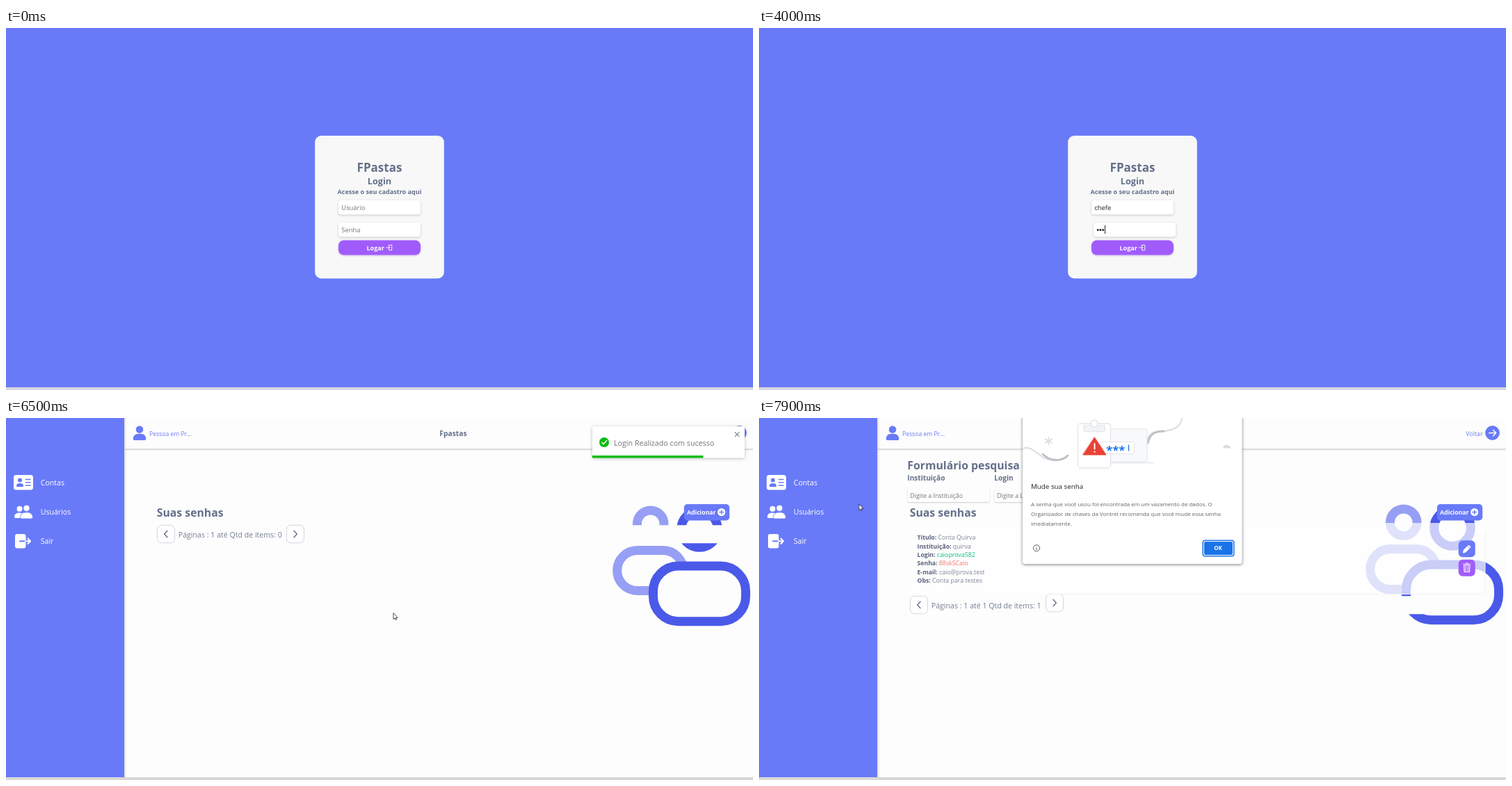
An HTML page with a canvas for the animation above (8000 ms loop, 1074x521 px).

```html
<!DOCTYPE html>
<html lang="pt">
<head>
<meta charset="utf-8">
<title>Login</title>
<style>
html, body { margin: 0; width: 100%; height: 100%; overflow: hidden; background: #697af8; }
canvas { display: block; width: 1074px; height: 521px; }
</style>
</head>
<body>
<canvas id="stage" width="1074" height="521"></canvas>
<script>
const W = 1074, H = 521, LOOP = 8000;
const BLUE = '#697af8', PURPLE = '#a05cfb', SLATE = '#64708a', GREY = '#757575';
const APP = 'FPastas', USER = 'chefe';
const c = document.getElementById('stage').getContext('2d');

// ---------- helpers ----------
const clamp = v => Math.max(0, Math.min(1, v));
const mix = (a, b, p) => a + (b - a) * p;

function bezier(x1, y1, x2, y2) {
  const at = (a, b, s) => 3 * a * s * (1 - s) ** 2 + 3 * b * s * s * (1 - s) + s ** 3;
  return x => {
    let lo = 0, hi = 1;
    for (let i = 0; i < 24; i++) {
      const m = (lo + hi) / 2;
      if (at(x1, x2, m) < x) lo = m; else hi = m;
    }
    return at(y1, y2, (lo + hi) / 2);
  };
}
const ease = bezier(.25, .1, .25, 1);
const easeOut = bezier(.215, .61, .355, 1);
const progress = (t, start, length) => ease(clamp((t - start) / length));

function along(points, t, curve = p => p) {
  for (let i = 1; i < points.length; i++) {
    const [t0, ...a] = points[i - 1], [t1, ...b] = points[i];
    if (t <= t1) {
      const p = curve(clamp((t - t0) / (t1 - t0)));
      return a.map((v, k) => mix(v, b[k], p));
    }
  }
  return points[points.length - 1].slice(1);
}

function layer(dx, dy, alpha, draw) {
  c.save();
  c.translate(dx, dy);
  c.globalAlpha *= alpha;
  draw();
  c.restore();
}

function shadow(y, blur, color) {
  c.shadowOffsetY = y; c.shadowBlur = blur; c.shadowColor = color;
}

function box(x, y, w, h, r, fill, stroke, lw = 1) {
  c.beginPath();
  c.roundRect(x, y, w, h, r);
  if (fill) { c.fillStyle = fill; c.fill(); }
  if (stroke) { c.strokeStyle = stroke; c.lineWidth = lw; c.stroke(); }
}

function raised(x, y, w, h, r, fill, dy, blur, color) {
  c.save();
  shadow(dy, blur, color);
  box(x, y, w, h, r, fill);
  c.restore();
}

function disc(x, y, r, fill, stroke, lw = 1) {
  c.beginPath();
  c.arc(x, y, r, 0, 7);
  if (fill) { c.fillStyle = fill; c.fill(); }
  if (stroke) { c.strokeStyle = stroke; c.lineWidth = lw; c.stroke(); }
}

function path(d, stroke, lw, fill) {
  const p = new Path2D(d);
  c.lineCap = c.lineJoin = 'round';
  if (fill) { c.fillStyle = fill; c.fill(p); }
  if (stroke) { c.strokeStyle = stroke; c.lineWidth = lw; c.stroke(p); }
}

function text(s, x, y, size, color, weight = 400, align = 'left') {
  c.font = `${weight} ${size}px "Open Sans", "Noto Sans", sans-serif`;
  c.textAlign = align;
  c.fillStyle = color;
  c.fillText(s, x, y);
  return c.measureText(s).width;
}

// ---------- login ----------
const USER_KEYS = [2100, 2250, 2350, 2500, 2600];
const PASS_KEYS = [3650, 3800, 3950, 4050, 4150];
const typed = (keys, t) => keys.filter(k => k <= t).length;
const SHIFT = 3.5;

function caret(x, y, t, keys, focus) {
  const since = Math.max(focus, ...keys.filter(k => k <= t));
  if (Math.floor((t - since) / 500) % 2) return;
  c.fillStyle = '#222';
  c.fillRect(Math.round(x), y - 6, 1, 12);
}

function field(y, dx) {
  raised(478 + dx, y, 118, 20.5, 3.5, '#fff', 1, 3.5, 'rgba(0,0,0,.2)');
}

function loginFields(t) {
  const onUser = t >= 1200 && t < 3350, onPass = t >= 3350;
  const du = onUser ? SHIFT * progress(t, 1200, 1000) : 0;
  const dp = onPass ? SHIFT * progress(t, 3350, 1000) : 0;
  const nu = typed(USER_KEYS, t), np = typed(PASS_KEYS, t);

  field(248, du);
  const w = text(nu ? USER.slice(0, nu) : 'Usuário', 482.3 + du, 262, 9.4, nu ? '#222' : GREY);
  if (onUser) caret(482.5 + du + (nu ? w : 0), 258, t, USER_KEYS, 1200);

  field(280, dp);
  if (!np) text('Senha', 482.3 + dp, 294, 9.4, GREY);
  for (let i = 0; i < np; i++) disc(484 + dp + i * 3.75, 290.7, 1.4, '#111');
  if (onPass) caret(482.4 + dp + np * 3.75, 290, t, PASS_KEYS, 3350);
}

function login(t) {
  c.fillStyle = BLUE;
  c.fillRect(0, 0, W, H);
  const busy = t >= 4300 && t < 4650, grow = busy ? 11.5 : 0;
  box(444.2, 155 - grow, 185.6, 205.5 + grow * 2, 9, '#f8f8f8');
  layer(0, -grow, 1, () => {
    text(APP, 537, 207, 17, SLATE, 700, 'center');
    text('Login', 537, 225, 12.7, SLATE, 700, 'center');
    text('Acesse o seu cadastro aqui', 537, 239, 9.1, SLATE, 700, 'center');
    loginFields(t);
    raised(478, 305.5, 118, 21, 7.5, PURPLE, 1, 2.5, 'rgba(120,40,220,.4)');
    text('Logar', 518.5, 320, 9, '#fff', 700);
    path('M550.5 314V312.3H554.7V319.7H550.5V318M546.7 316H552M550 314L552 316L550 318', '#fff', .9);
    if (busy) {
      const a = t / 90;
      c.beginPath();
      c.arc(537, 339, 7, a, a + 4.5);
      c.strokeStyle = PURPLE;
      c.lineWidth = 2;
      c.stroke();
    }
  });
}

// ---------- toast ----------
function toast(t) {
  const IN = 4548, OUT = 6550, BAR = 5250;
  if (t < IN || t >= OUT + 650) return;
  let dx, alpha = 1;
  if (t < OUT) {
    [dx] = along([[IN, 1677], [IN + 420, -14], [IN + 525, 5.6], [IN + 630, -2.8], [IN + 700, 0]], t, easeOut);
    alpha = easeOut(clamp((t - IN) / 420));
  } else {
    [dx, alpha] = along([[OUT, 0, 1], [OUT + 130, -11, 1], [OUT + 650, 1118, 0]], t, ease);
  }
  layer(843 + dx, 0, alpha, () => {
    raised(0, 12, 219, 45.5, 2, '#fff', 1, 5, 'rgba(0,0,0,.25)');
    disc(17, 35, 7, '#07bc0c');
    path('M13.8 35.3L16.2 37.6L20.6 32.6', '#fff', 1.5);
    text('Login Realizado com sucesso', 31, 40, 10.7, GREY);
    path('M205.3 20.7L211 26.4M211 20.7L205.3 26.4', '#8a8a8a', 1.3);
    c.fillStyle = '#07bc0c';
    c.fillRect(0, 54, 219 * (1 - clamp((t - BAR) / 4600)), 3.5);
  });
}

// ---------- panel ----------
const OPEN = 6500, LOADED = 6982;

function person(x, y, s, fill) {
  disc(x, y, 5.3 * s, fill);
  box(x - 9.3 * s, y + 6.3 * s, 18.6 * s, 9.2 * s, [7 * s, 7 * s, 2 * s, 2 * s], fill);
}

function sidebar() {
  raised(0, -10, 170, H + 20, 0, BLUE, 0, 4, 'rgba(0,0,0,.3)');
  box(11, 82, 28, 21.5, 3.5, '#fff');
  disc(20, 89.5, 3, BLUE);
  box(15, 94, 10, 5, [4, 4, 1, 1], BLUE);
  path('M28.5 88.5H35M28.5 92.8H35M28.5 97H35', BLUE, 1.5);
  disc(19.5, 130.8, 4, '#fff');
  box(12, 136.5, 14, 7.5, [6, 6, 2, 2], '#fff');
  disc(29.5, 129.8, 4.6, '#fff', BLUE, .8);
  box(20.5, 135.8, 18, 9.2, [7, 7, 2, 2], '#fff', BLUE, .8);
  box(13, 167, 15.5, 20.5, 3, '#fff');
  path('M20 177.2H28', BLUE, 2);
  path('M28 177.2H34.5M31.5 173.5L35 177.2L31.5 181', '#fff', 2);
  ['Contas', 'Usuários', 'Sair'].forEach((s, i) => text(s, 49.7, 97.3 + i * 42, 10.6, '#fff', 500));
}

function header() {
  raised(170, -5, W, 49.3, 0, '#fdfdfd', 1, 2.5, 'rgba(0,0,0,.3)');
  person(192, 16.5, 1, BLUE);
  text('Pessoa em Pr...', 206, 25.7, 8.6, BLUE);
  text(APP[0] + APP.slice(1).toLowerCase(), 643, 26, 10.3, SLATE, 700, 'center');
  text('Voltar', 1016.3, 25.5, 8.8, BLUE);
  disc(1054.5, 21.5, 10.4, BLUE);
  path('M1049.5 21.5H1059.5M1055.5 17.3L1059.7 21.5L1055.5 25.7', '#fff', 1.5);
}

function people(t) {
  const LIGHT = '#969ff4', DARK = '#4b59e9';
  const lift = -2.8 * (1 - Math.cos((t - OPEN) / 1750 * 2 * Math.PI));
  layer(0, lift, 1, () => {
    disc(926.7, 152.2, 19.3, null, LIGHT, 13);
    box(878.7, 190.5, 95, 58, 29, null, LIGHT, 13);
    disc(997, 160, 26.3, null, DARK, 13);
    box(930.5, 213, 133, 79.7, 36, '#fdfdfd', DARK, 13);
  });
}

function addButton() {
  box(974.8, 124, 65.4, 23.5, 5, BLUE);
  text('Adicionar', 979, 139.3, 8.7, '#fff', 700);
  disc(1028.7, 135.5, 5.6, '#fff');
  path('M1025.8 135.5H1031.6M1028.7 132.6V138.4', BLUE, 1.4);
}

function searchForm(t) {
  const p = progress(t, OPEN, 1000);
  layer(213.3 + W * (1 - p), 0, p, () => {
    text('Formulário pesquisa', 0, 74, 15.8, SLATE, 700);
    ['Instituição', 'Login', 'Titulo'].forEach((s, i) => {
      const x = i * 125;
      text(s, x, 90, 10.1, SLATE, 700);
      raised(x, 101, 118, 20, 3, '#fdfdfd', 1, 2, 'rgba(0,0,0,.2)');
      text('Digite ' + ['a Instituição', 'a Login', 'a Título'][i], x + 4, 114.7, 8.8, GREY);
    });
    box(375.5, 97, 67, 24, 5, '#a663fc');
    text('Pesquisar', 380, 112.7, 8.5, '#fff', 700);
    disc(428.7, 107.8, 4.6, null, '#fff', 1.7);
    path('M432.3 111.4L436.6 115.7', '#fff', 1.9);
  });
}

const ITEM = [
  ['Titulo:', 'Conta Quirva', '#7b8496'],
  ['Instituição:', 'quirva', '#7b8496'],
  ['Login:', 'caioprova582', '#10b981'],
  ['Senha:', '88skSCaio', '#f8716b'],
  ['E-mail:', 'caio@prova.test', '#7b8496'],
  ['Obs:', 'Conta para testes', '#7b8496']
];

function item(t) {
  if (t < LOADED) return;
  const p = progress(t, LOADED, 920);
  layer(W * (1 - p), 0, p, () => {
    box(213, 151, 831, 102.5, 6, 'rgba(255,255,255,.7)');
    path('M1044 165V247Q1044 253.5 1037 253.5H430', '#f0f0f4', 1);
    ITEM.forEach(([label, value, color], i) => {
      const y = 175.2 + i * 12.35;
      const w = text(label + ' ', 227.5, y, 8.7, '#56617a', 700);
      text(value, 227.5 + w, y, 8.8, color);
    });
    box(1005.7, 176.3, 24, 24, 6, BLUE);
    path('M1012.5 193.7L1013.3 190L1020.3 183L1023.2 185.9L1016.2 192.9Z', '#fff', 1, '#fff');
    path('M1018.6 184.5L1021.7 187.6', BLUE, .8);
    box(1005.7, 203.7, 24, 24, 6, PURPLE);
    path('M1012.5 210.5H1023M1016 209H1019.5M1013.5 212.5L1014.2 221.5H1021.3L1022 212.5Z', '#fff', 1.2);
    path('M1016.2 214V220M1019.3 214V220', '#fff', 1.1);
  });
}

function pager(t) {
  const full = t >= LOADED, y = full ? 256.3 : 154.3;
  const x = full ? 412 : 403;
  const up = -3 * progress(t, 7250, 350);
  box(217, y, 826, 26, 6, '#fdfdfd');
  const button = (bx, by, d) => {
    box(bx + .5, by, 25, 25.5, 6, '#fff', '#d3d6e0');
    path(`M${bx + 13 - d * 2} ${by + 8}L${bx + 13 + d * 2.3} ${by + 12.7}L${bx + 13 - d * 2} ${by + 17.4}`, SLATE, 1.4);
  };
  button(217, y, -1);
  text(full ? 'Páginas : 1 até 1 Qtd de items: 1' : 'Páginas : 1 até Qtd de items: 0', 247.8, y + 17.4, 10.6, '#737d92');
  button(x, y + up, 1);
}

function dialog(t) {
  if (t < 7850) return;
  raised(379, -10, 315.5, 220, 3, '#fff', 1, 4, 'rgba(0,0,0,.5)');
  const line = '#e3e5e9';
  path('M379 44C396 38 404 62 424 61C434 61 439 58 444 54', '#dadce0', 2);
  path('M408 52C418 62 434 64 444 54', '#bdc1c6', 3);
  path('M556 42C560 12 574 22 588 18C602 15 608 9 608 -2', '#dadce0', 2);
  path('M559 36C562 22 570 19 582 19', '#bdc1c6', 3);
  path('M416.5 27.5V38.5M411.7 30.2L421.3 35.8M421.3 30.2L411.7 35.8', '#dadce0', 1.6);
  path('M667 43.5C667 37 678 37 678 43.5Z', null, 0, '#dadce0');
  box(490, 16, 68, 47, 2, '#f8f9fa', line);
  path('M490 64.5H567', line, 1.5);
  box(458.5, 8, 47, 64, 4, '#fff', line, 1.3);
  box(466.5, 10.5, 31, 9, 2, '#f1f3f4', line);
  disc(482, 8, 5, '#fff', line, 1.5);
  box(491, 34.5, 48.5, 17, 2, '#fff', line);
  text('***', 499.3, 52, 16.5, '#1a73e8', 700);
  path('M531.5 39V47', '#1a73e8', 1.3);
  path('M482.5 28L499 53H466Z', '#e94235', 1, '#e94235');
  path('M482.5 37V44.5', '#fff', 2);
  disc(482.5, 48.6, 1.2, '#fff');
  text('Mude sua senha', 391, 102, 9.8, '#202124');
  [
    'A senha que você usou foi encontrada em um vazamento de dados. O',
    'Organizador de chaves da Vontrel recomenda que você mude essa senha',
    'imediatamente.'
  ].forEach((s, i) => text(s, 391, 127 + i * 14, 8, '#5f6368'));
  disc(399, 187.3, 4.6, null, '#5f6368');
  path('M399 187V189.5M399 185V185.1', '#5f6368', 1.1);
  box(638.2, 176.2, 44.6, 22.6, 3, '#fff', '#1a73e8', 1.5);
  box(640, 178, 41, 19, 2, '#1a73e8');
  text('OK', 660, 190.3, 8, '#fff', 700, 'center');
}

function panel(t) {
  c.fillStyle = '#fdfdfd';
  c.fillRect(0, 0, W, H);
  people(t);
  text('Suas senhas', 216.7, 142, 15.8, SLATE, 700);
  searchForm(t);
  pager(t);
  item(t);
  addButton();
  header();
  sidebar();
}

// ---------- pointer ----------
function pointer(t) {
  let at;
  if (t >= 150 && t < 950) {
    at = along([[150, 13, 0], [800, 515, 271], [950, 516, 258]], t, p => p * (2 - p));
  } else if (t >= OPEN) {
    at = along([[6500, 556.5, 280.5], [7200, 436.2, 279], [7900, 143.3, 123.5]], t, p => p * p * (3 - 2 * p));
  } else return;
  layer(at[0], at[1], 1, () =>
    path('M.5 .5V9.2L2.5 7.4L3.8 10.3L5 9.7L3.8 7H6.3Z', '#222', .8, '#fff'));
}

function draw(now) {
  const t = now % LOOP;
  c.clearRect(0, 0, W, H);
  (t < OPEN ? login : panel)(t);
  toast(t);
  dialog(t);
  c.fillStyle = t < OPEN ? '#d4d5dd' : '#d8d8d8';
  c.fillRect(0, 517, W, 4);
  pointer(t);
}

const start = performance.now();
function tick() {
  draw(performance.now() - start);
  requestAnimationFrame(tick);
}
tick();
</script>
</body>
</html>
```
